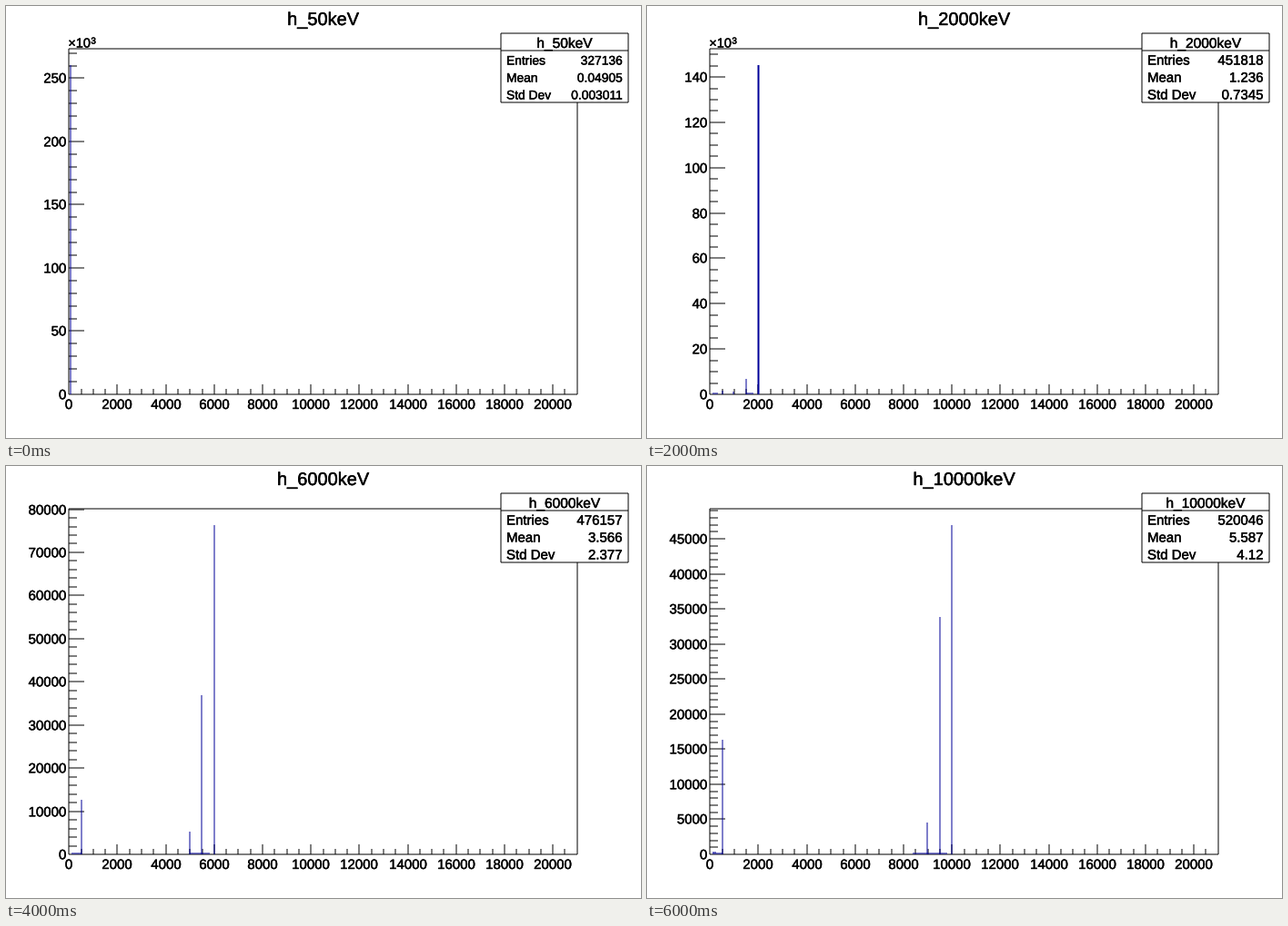
Recreate the animation shown at these times as a matplotlib script. Size 698x475 px, loop 6.1 s.

```python
import math

import numpy as np
import matplotlib.pyplot as plt
from matplotlib import patheffects
from matplotlib.animation import FuncAnimation
from matplotlib.patches import Rectangle

plt.rcParams["font.family"] = "Liberation Sans"
plt.rcParams["text.hinting"] = "none"

W, H, DPI = 698, 475, 100
# The plot area leaves a margin of one tenth on every side
X0, X1, Y0, Y1 = 0.1 * W, 0.9 * W, 0.9 * H, 0.1 * H
LEFT, RIGHT, BOTTOM, TOP = (int(v) for v in (X0, X1, Y0, Y1))
X_MAX = 21000
BLUE = (0, 0, 0.6)
BOLDER = [patheffects.withStroke(linewidth=0.3, foreground="black")]
ELECTRON = 511

# Measured values at a few beam energies (keV), counts in thousands
ENERGY = [50, 100, 2000, 3400, 6000, 7600, 10000]
PEAK = [260.3, 340, 145.2, 109.0, 76.3, 63.5, 46.95]
ENTRIES = [327136, 471634, 451818, 450923, 476157, 494346, 520046]
MEAN = [0.04905, 0.09452, 1.236, 2.071, 3.566, 4.402, 5.587]
STD = [0.003011, 0.01216, 0.7345, 1.28, 2.377, 3.074, 4.12]

PAIR_ENERGY = [1022, 2000, 3400, 6000, 7600, 10000]
SINGLE = [0, 6.8, 22.6, 36.9, 37.7, 33.85]
DOUBLE = [0, 1.2, 3.3, 5.3, 5.2, 4.5]
ANNIHILATION = [0, 1.8, 6.6, 12.6, 14.5, 16.4]


def smooth(x, xs, ys):
    """Monotone cubic interpolation."""
    xs, ys = np.asarray(xs, float), np.asarray(ys, float)
    h = np.diff(xs)
    d = np.diff(ys) / h
    slope = np.concatenate(([d[0]], np.zeros(len(d) - 1), [d[-1]]))
    for i in range(1, len(d)):
        if d[i - 1] * d[i] > 0:
            a, b = 2 * h[i] + h[i - 1], h[i] + 2 * h[i - 1]
            slope[i] = (a + b) / (a / d[i - 1] + b / d[i])
    i = int(np.clip(np.searchsorted(xs, x, side="right") - 1, 0, len(d) - 1))
    t = (x - xs[i]) / h[i]
    return (ys[i] * (1 + 2 * t) * (1 - t) ** 2 + ys[i + 1] * t * t * (3 - 2 * t)
            + h[i] * t * (1 - t) * (slope[i] * (1 - t) - slope[i + 1] * t))


def by_log_energy(e, values):
    return smooth(math.log(e), np.log(ENERGY), values)


def scaled(e, values):
    return e * by_log_energy(e, np.divide(values, ENERGY))


def beam_energy(i):
    return 50 + 5 * i if i <= 10 else 200 * (i - 10)


def nice_step(top):
    """Major step and its number of subdivisions, for at most ten steps."""
    raw = top / 10
    unit = 10 ** math.floor(math.log10(raw))
    for factor, parts in ((1, 5), (2, 4), (5, 5), (10, 5)):
        if raw <= factor * unit:
            return factor * unit, parts


def x_pix(v):
    return int(X0 + v * (X1 - X0) / X_MAX)


def y_pix(v, top):
    return int(Y0 - v * (Y0 - Y1) / top)


fig = plt.figure(figsize=(W / DPI, H / DPI), dpi=DPI, facecolor="white")
ax = fig.add_axes([0, 0, 1, 1])
ax.set_xlim(0, W)
ax.set_ylim(H, 0)
ax.axis("off")
moving = []


def rect(x, y, w, h, color, z):
    return ax.add_patch(Rectangle((x, y), w, h, facecolor=color, linewidth=0,
                                  snap=False, zorder=z))


# Lines are one pixel wide and centred on whole coordinates
def hline(x0, x1, y, color="black", z=2):
    return rect(x0, y - 0.5, x1 - x0, 1, color, z)


def vline(x, y0, y1, color="black", z=2, width=1):
    return rect(x - 0.5, y0, width, y1 - y0, color, z)


def label(x, y, s, size=15, ha="left"):
    return ax.text(x, y, s, fontsize=size * 72 / DPI, ha=ha, va="baseline",
                   color="black", zorder=6, path_effects=BOLDER)


def outline(x0, y0, x1, y1, z):
    for y in (y0, y1):
        hline(x0, x1, y, z=z)
    for x in (x0, x1):
        vline(x, y0, y1, z=z)


def draw_fixed():
    outline(LEFT, TOP, RIGHT, BOTTOM, 2)
    for v in range(500, X_MAX, 500):
        vline(x_pix(v), BOTTOM - (11 if v % 2000 == 0 else 6), BOTTOM)
    for v in range(0, X_MAX, 2000):
        label(x_pix(v), 443, str(v), ha="center")
    rect(544, 30, 140, 76, "white", 4)
    outline(544, 30, 684, 106, 5)
    hline(544, 684, 49, z=5)


def draw_axis(top):
    step, parts = nice_step(top)
    minor = step / parts
    last = math.floor(top / step) * step
    thousands = last >= 100
    for k in range(int(top / minor) + 1):
        v = k * minor
        y = y_pix(v, top)
        major = k % parts == 0
        if k:
            moving.append(hline(LEFT, LEFT + (17 if major else 9), y))
        if major:
            s = f"{v if thousands else v * 1000:.0f}"
            moving.append(label(66.3, y + 5.3, s, ha="right"))
    if thousands:
        moving.append(label(68.3, 45.5, "×10", 14.5))
        moving.append(label(93.3, 41.5, "3", 10))


def draw_spike(e, count, top):
    # A bin whose edges fall on neighbouring pixels comes out twice as wide
    a, b = x_pix(e), x_pix(e + 1)
    moving.append(vline(a, y_pix(count, top), BOTTOM, BLUE, 3, 1 + b - a))


def draw_band(e0, e1, level=1):
    moving.append(hline(x_pix(e0), x_pix(e1), BOTTOM - level, BLUE, 3))


def draw_spectrum(e, peak, top):
    draw_spike(e, peak, top)
    if e <= 2 * ELECTRON:
        return
    for place, heights in ((e - ELECTRON, SINGLE), (e - 2 * ELECTRON, DOUBLE),
                           (ELECTRON, ANNIHILATION)):
        draw_spike(place, smooth(e, PAIR_ENERGY, heights), top)
    draw_band(90, 330 if e < 4000 else 500)
    if e > 7000:
        draw_band(120, 260, 2)
    start = e - ELECTRON * (1 if e < 4000 else 2) - 0.25 * max(0, e - 7600)
    draw_band(start, e - 200)


def draw_stats(e, name):
    values = [str(round(by_log_energy(e, ENTRIES))),
              f"{scaled(e, MEAN):.4g}", f"{scaled(e, STD):.4g}"]
    size = 13.8 if max(map(len, values)) >= 8 else 15
    moving.append(label(614, 46, name, 15.5, "center"))
    for k, (key, value) in enumerate(zip(("Entries", "Mean", "Std Dev"), values)):
        y = 64.5 + 19 * k
        moving.append(label(550, y, key, size))
        moving.append(label(677.5, y, value, size, "right"))


def update(i):
    while moving:
        moving.pop().remove()
    e = beam_energy(i)
    peak = math.exp(by_log_energy(e, np.log(PEAK)))
    top = 1.05 * peak
    name = f"h_{e}keV"
    moving.append(label(348.6, 21, name, 20, "center"))
    draw_axis(top)
    draw_spectrum(e, peak, top)
    draw_stats(e, name)
    return moving


draw_fixed()
anim = FuncAnimation(fig, update, frames=61, interval=100, init_func=lambda: [],
                     repeat=True, repeat_delay=0, blit=False)
plt.show()
```
